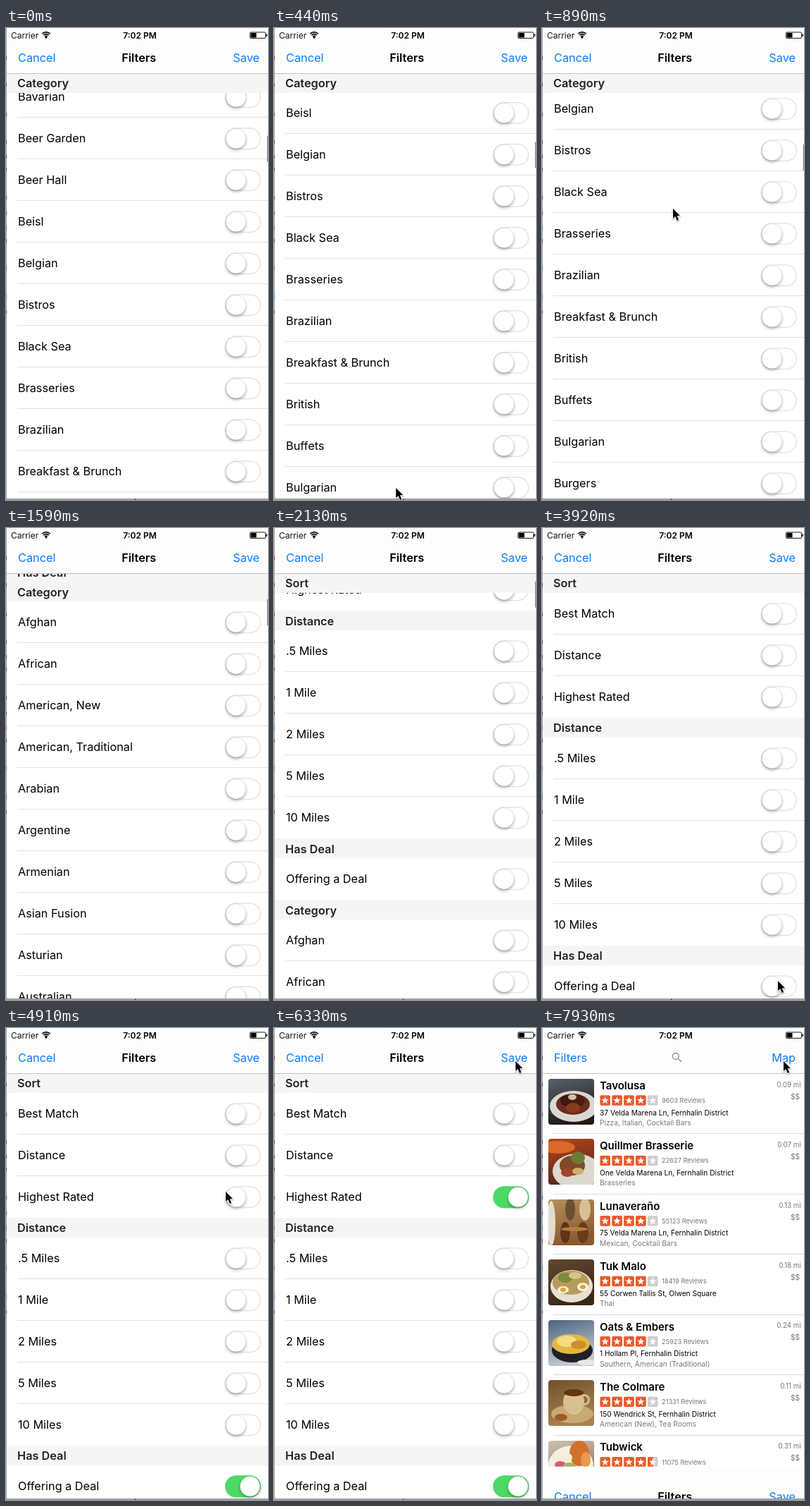
Recreate the animation shown at these times as an HTML page with a canvas. Size 372 px wide and 669 px high, loop 8 s.

```html
<!DOCTYPE html>
<html lang="en">
<head>
<meta charset="utf-8">
<title>Filters</title>
<style>
  html, body { margin: 0; width: 100%; height: 100%; overflow: hidden; background: #fff; }
  canvas { display: block; }
</style>
</head>
<body>
<canvas id="stage" width="372" height="669"></canvas>
<script>
const W = 372, H = 669, LOOP = 8000;
const BAR = 64, HEADER = 28, ROW = 59;
const BLUE = '#0a7cff', GREEN = '#4cd964';
const ctx = document.getElementById('stage').getContext('2d');

const sections = [
  ['Sort', ['Best Match', 'Distance', 'Highest Rated']],
  ['Distance', ['.5 Miles', '1 Mile', '2 Miles', '5 Miles', '10 Miles']],
  ['Has Deal', ['Offering a Deal']],
  ['Category', ['Afghan', 'African', 'American, New', 'American, Traditional', 'Arabian',
    'Argentine', 'Armenian', 'Asian Fusion', 'Asturian', 'Australian', 'Austrian', 'Baguettes',
    'Bangladeshi', 'Barbeque', 'Basque', 'Bavarian', 'Beer Garden', 'Beer Hall', 'Beisl',
    'Belgian', 'Bistros', 'Black Sea', 'Brasseries', 'Brazilian', 'Breakfast & Brunch',
    'British', 'Buffets', 'Bulgarian', 'Burgers', 'Burmese', 'Cafes', 'Cafeteria']]
];

// Photo: background colours, then ellipses [x, y, rx, ry, colour] in a 65 px square.
const places = [
  { name: 'Tavolusa', reviews: 9603, stars: 4, miles: '0.09',
    address: '37 Velda Marena Ln, Fernhalin District', kind: 'Pizza, Italian, Cocktail Bars',
    photo: ['#59636f', '#211a17', [36, 39, 34, 22, '#d9d7d5'], [35, 36, 24, 15, '#6e2c1c'],
      [26, 31, 9, 8, '#3d1812'], [42, 31, 10, 8, '#4a1c13'], [35, 41, 10, 7, '#8b3a22'], [34, 26, 6, 4, '#d8bf9d']] },
  { name: 'Quillmer Brasserie', reviews: 22627, stars: 4, miles: '0.07',
    address: 'One Velda Marena Ln, Fernhalin District', kind: 'Brasseries',
    photo: ['#b8451d', '#54291c', [40, 46, 34, 25, '#dcd8cf'], [14, 12, 24, 9, '#d9682b'],
      [34, 38, 18, 14, '#7f4a28'], [42, 27, 10, 9, '#6d7a35'], [27, 48, 9, 6, '#a4452a'], [42, 46, 8, 5, '#cfae6b']] },
  { name: 'Lunaveraño', reviews: 55123, stars: 4, miles: '0.13',
    address: '75 Velda Marena Ln, Fernhalin District', kind: 'Mexican, Cocktail Bars',
    photo: ['#b78e5f', '#8a5a30', [4, 34, 6, 32, '#e3ddcd'], [31, 14, 7, 16, '#6b5032'],
      [52, 14, 8, 16, '#d9c094'], [24, 47, 7, 15, '#5e3318'], [49, 47, 8, 15, '#6b3c1b'], [37, 42, 19, 3, '#b57c43']] },
  { name: 'Tuk Malo', reviews: 18419, stars: 4, miles: '0.18',
    address: '55 Corwen Tallis St, Olwen Square', kind: 'Thai',
    photo: ['#62462e', '#3c2717', [33, 38, 30, 23, '#e6e1d3'], [32, 33, 26, 17, '#b89a5c'],
      [24, 26, 10, 7, '#7c8a3b'], [21, 43, 8, 5, '#f5f1e2'], [21, 43, 4, 3, '#e2a52d'],
      [49, 39, 8, 6, '#f5f1e2'], [49, 39, 4, 3, '#e2a52d'], [38, 23, 9, 5, '#d8c48c']] },
  { name: 'Oats & Embers', reviews: 25923, stars: 4, miles: '0.24',
    address: '1 Hollam Pl, Fernhalin District', kind: 'Southern, American (Traditional)',
    photo: ['#4b6380', '#c4c9d0', [34, 43, 29, 17, '#1d2028'], [32, 34, 27, 14, '#e3b640'],
      [26, 30, 14, 8, '#f3dc83'], [43, 35, 11, 6, '#cf8d27'], [55, 60, 14, 4, '#e9e9ea']] },
  { name: 'The Colmare', reviews: 21331, stars: 4, miles: '0.11',
    address: '150 Wendrick St, Fernhalin District', kind: 'American (New), Tea Rooms',
    photo: ['#71502c', '#a88352', [34, 48, 30, 13, '#c8a873'], [51, 28, 8, 8, '#d7bd8d'],
      [51, 28, 5, 5, '#8e6b3f'], [36, 31, 15, 18, '#d9c094'], [36, 18, 14, 5, '#633411'], [18, 53, 9, 5, '#a05a20']] },
  { name: 'Tubwick', reviews: 11075, stars: 4.5, miles: '0.31',
    address: '8 Hollam Pl, Fernhalin District', kind: 'American (New), Gastropubs',
    photo: ['#cfc2b2', '#8f7153', [32, 35, 32, 28, '#f2eeea'], [44, 18, 14, 18, '#d3712b'],
      [20, 24, 14, 9, '#f6eed6'], [17, 34, 8, 5, '#d45c79'], [30, 36, 9, 5, '#a9b465'], [53, 27, 7, 11, '#e99a4b']] }
];

// Pointer tip: [time, x, y]
const pointerPath = [
  [350, 172, 690], [850, 186, 256], [890, 186, 256], [1220, 186, 650], [1290, 190, 690],
  [2400, 240, 690], [2800, 255, 598], [2960, 255, 598], [3110, 272, 572], [3330, 272, 572],
  [3900, 335, 642], [4200, 335, 642], [4370, 260, 172], [4500, 260, 172], [4910, 312, 232],
  [5170, 324, 234], [5680, 324, 234], [6120, 342, 18], [6240, 345, 52], [6330, 343, 47]
];

const clamp = v => Math.max(0, Math.min(1, v));
const smooth = v => { v = clamp(v); return v * v * (3 - 2 * v); };

function scrollAt(t) {
  if (t < 890) {
    const rest = Math.exp(-890 / 500);
    return 1743 - 219.6 * (Math.exp(-t / 500) - rest) / (1 - rest);
  }
  if (t < 1220) return 1743 - 390 * ((t - 890) / 330) ** 2.4;
  return Math.max(0, 684.2 * Math.exp(-(t - 1590) / 500) - 80);
}

function dismissAt(t) {
  const x = Math.max(0, t - 7640) * 0.0149;
  return (H - 0.5) * (1 - (1 + x) * Math.exp(-x));
}

function pointerAt(t) {
  if (t >= 890 && t < 1220) return [186, 256 + 1743 - scrollAt(t)];
  const next = pointerPath.findIndex(p => p[0] > t);
  if (next <= 0) return pointerPath[next ? pointerPath.length - 1 : 0].slice(1);
  const [t0, x0, y0] = pointerPath[next - 1], [t1, x1, y1] = pointerPath[next];
  const k = smooth((t - t0) / (t1 - t0));
  return [x0 + (x1 - x0) * k, y0 + (y1 - y0) * k];
}

function rect(x, y, w, h, color) {
  ctx.fillStyle = color;
  ctx.fillRect(x, y, w, h);
}

function roundRect(x, y, w, h, r) {
  ctx.beginPath();
  ctx.roundRect(x, y, w, h, r);
}

// cy is the middle of the capital letters
function text(str, x, cy, size, color = '#000', weight = 400, align = 'left') {
  ctx.font = `${weight} ${size}px Inter, Roboto, sans-serif`;
  ctx.textAlign = align;
  ctx.fillStyle = color;
  ctx.fillText(str, x, cy + size * 0.364);
}

function drawSwitch(cy, on) {
  roundRect(311.7, cy - 14.6, 49.6, 29.6, 14.8);
  ctx.fillStyle = '#fff';
  ctx.fill();
  ctx.lineWidth = 1.4;
  ctx.strokeStyle = '#e4e4e4';
  ctx.stroke();
  if (on > 0) {
    ctx.globalAlpha = on;
    roundRect(311, cy - 15.3, 51, 31, 15.5);
    ctx.fillStyle = GREEN;
    ctx.fill();
    ctx.globalAlpha = 1;
  }
  ctx.save();
  ctx.shadowColor = 'rgba(0,0,0,.32)';
  ctx.shadowBlur = 4;
  ctx.shadowOffsetY = 2.2;
  ctx.beginPath();
  ctx.arc(326.5 + 20 * on, cy + 0.2, 14.1, 0, 7);
  ctx.fillStyle = '#fff';
  ctx.fill();
  ctx.restore();
  ctx.lineWidth = 0.5;
  ctx.strokeStyle = 'rgba(0,0,0,.14)';
  ctx.stroke();
}

function drawNav(left, right) {
  rect(1, 0, W - 1, BAR, '#fdfdfd');
  rect(1, BAR, W - 1, 1, '#c4c4c4');
  text(left, 17, 42.2, 16.3, BLUE);
  text(right, 360, 42.2, 16.3, BLUE, 400, 'right');
}

function drawFilters(t) {
  const scroll = scrollAt(t);
  const switches = {
    'Offering a Deal': smooth((t - 3930) / 250),
    'Highest Rated': smooth((t - 5390) / 250)
  };
  rect(1, 0, W - 1, H, '#fff');

  let y = BAR - scroll;
  const tops = [];
  for (const [, rows] of sections) {
    tops.push(y);
    y += HEADER;
    rows.forEach((label, i) => {
      if (y > BAR - ROW && y < H) {
        text(label, 17, y + 29.3, 16.25);
        drawSwitch(y + 29.5, switches[label] || 0);
        if (i < rows.length - 1) rect(16, Math.round(y + ROW - 1), W - 16, 1, '#e1e1e2');
      }
      y += ROW;
    });
  }
  sections.forEach(([title], i) => {
    const pushed = i + 1 < tops.length ? tops[i + 1] - HEADER : Infinity;
    const top = Math.min(Math.max(tops[i], BAR), pushed);
    if (top < BAR - HEADER || top > H) return;
    rect(1, top, W - 1, HEADER, '#f5f5f5');
    text(title, 16, top + 14.5, 16.3, '#222', 600);
  });

  const fade = 1 - clamp((t - 2680) / 150);
  if (fade > 0) {
    ctx.globalAlpha = fade;
    roundRect(370.7, 67 + scroll * 0.0561, 2.5, 37.5, 1.2);
    ctx.fillStyle = '#858585';
    ctx.fill();
    ctx.globalAlpha = 1;
  }
  drawNav('Cancel', 'Save');
  text('Filters', 188.7, 42.2, 16.3, '#000', 600, 'center');
}

function drawPhoto([from, to, ...blobs], x, y) {
  ctx.save();
  roundRect(x, y, 65, 65, 4);
  ctx.clip();
  ctx.translate(x, y);
  const shade = ctx.createLinearGradient(0, 0, 20, 65);
  shade.addColorStop(0, from);
  shade.addColorStop(1, to);
  rect(0, 0, 65, 65, shade);
  for (const [cx, cy, rx, ry, color] of blobs) {
    ctx.beginPath();
    ctx.ellipse(cx, cy, rx, ry, 0, 0, 7);
    ctx.fillStyle = color;
    ctx.fill();
  }
  ctx.restore();
}

function drawStar(x, y, fill) {
  ctx.save();
  roundRect(x, y, 14.6, 14.6, 2);
  ctx.clip();
  rect(x, y, 15, 15, '#cecece');
  rect(x, y, 15 * fill, 15, '#ea5a2c');
  ctx.beginPath();
  for (let i = 0; i < 10; i++) {
    const a = i * Math.PI / 5 - Math.PI / 2, r = i % 2 ? 2.3 : 5.5;
    ctx.lineTo(x + 7.3 + r * Math.cos(a), y + 7.6 + r * Math.sin(a));
  }
  ctx.fillStyle = '#fff';
  ctx.fill();
  ctx.restore();
}

function drawResults() {
  rect(1, 0, W - 1, H, '#fff');
  places.forEach((place, i) => {
    const y = 64.3 + 85.45 * i;
    drawPhoto(place.photo, 9, Math.round(y + 7.7));
    text(place.name, 82, y + 17, 15, '#000', 600);
    for (let s = 0; s < 5; s++) drawStar(82.3 + 16.9 * s, y + 30.9, clamp(place.stars - s));
    text(place.reviews + ' Reviews', 170, y + 38.3, 9.25, '#777');
    text(place.address, 82, y + 55.5, 10.2);
    text(place.kind, 82, y + 69.7, 10.2, '#777');
    text(place.miles + ' mi', 367.5, y + 15.8, 9.7, '#777', 400, 'right');
    text('$$', 366, y + 32.6, 10.2, '#777', 400, 'right');
    rect(16, Math.round(y + 85), W - 16, 1, '#dcdcdd');
  });
  drawNav('Filters', 'Map');
  ctx.strokeStyle = '#777';
  ctx.lineWidth = 1.1;
  ctx.beginPath();
  ctx.arc(189.8, 40, 4.4, 0, 7);
  ctx.moveTo(193, 43.2);
  ctx.lineTo(198, 48);
  ctx.stroke();
}

function drawStatus() {
  text('Carrier', 7, 10.3, 12, '#111');
  text('7:02 PM', 190, 10.3, 12, '#000', 600, 'center');
  ctx.strokeStyle = '#000';
  ctx.lineWidth = 1.7;
  for (const r of [2.7, 5.4, 8.1]) {
    ctx.beginPath();
    ctx.arc(57, 14, r, -Math.PI * 0.75, -Math.PI * 0.25);
    ctx.stroke();
  }
  ctx.beginPath();
  ctx.arc(57, 13.4, 1.3, 0, 7);
  ctx.fillStyle = '#000';
  ctx.fill();
  roundRect(346.5, 6, 22, 8.5, 1.5);
  ctx.lineWidth = 0.9;
  ctx.stroke();
  rect(347.5, 7, 8, 6.5, '#000');
  rect(369.4, 8.5, 1.4, 3.5, '#000');
}

// Sliver of the desktop around the window
function drawEdges() {
  rect(0, 0, 1, H, '#a2a2a2');
  for (const y of [40, 78, 120, 159, 180, 198, 238, 260, 299, 400]) rect(0, y, 1, 5, '#555');
  for (const y of [280, 338, 378]) rect(0, y, 1, 6, '#4a7fc0');
  rect(0, H - 2, W, 1, '#858585');
  rect(0, H - 1, W, 1, '#b5b5b5');
  rect(183, H - 2, 1, 2, '#333');
}

function drawPointer([x, y]) {
  ctx.save();
  ctx.translate(x, y);
  ctx.beginPath();
  for (const [px, py] of [[0, 0], [0, 14], [3.2, 11], [5.8, 17], [8.2, 16], [5.7, 10.2], [10, 10]]) ctx.lineTo(px, py);
  ctx.closePath();
  ctx.shadowColor = 'rgba(0,0,0,.35)';
  ctx.shadowBlur = 2;
  ctx.shadowOffsetY = 1;
  ctx.strokeStyle = '#fff';
  ctx.lineWidth = 1.8;
  ctx.stroke();
  ctx.shadowColor = 'transparent';
  ctx.fillStyle = '#000';
  ctx.fill();
  ctx.restore();
}

function draw(now) {
  const t = now % LOOP;
  const drop = dismissAt(t);
  if (drop > 0) drawResults();
  ctx.save();
  ctx.translate(0, drop);
  drawFilters(t);
  ctx.restore();
  drawStatus();
  drawEdges();
  drawPointer(pointerAt(t));
  requestAnimationFrame(draw);
}
requestAnimationFrame(draw);
</script>
</body>
</html>
```
